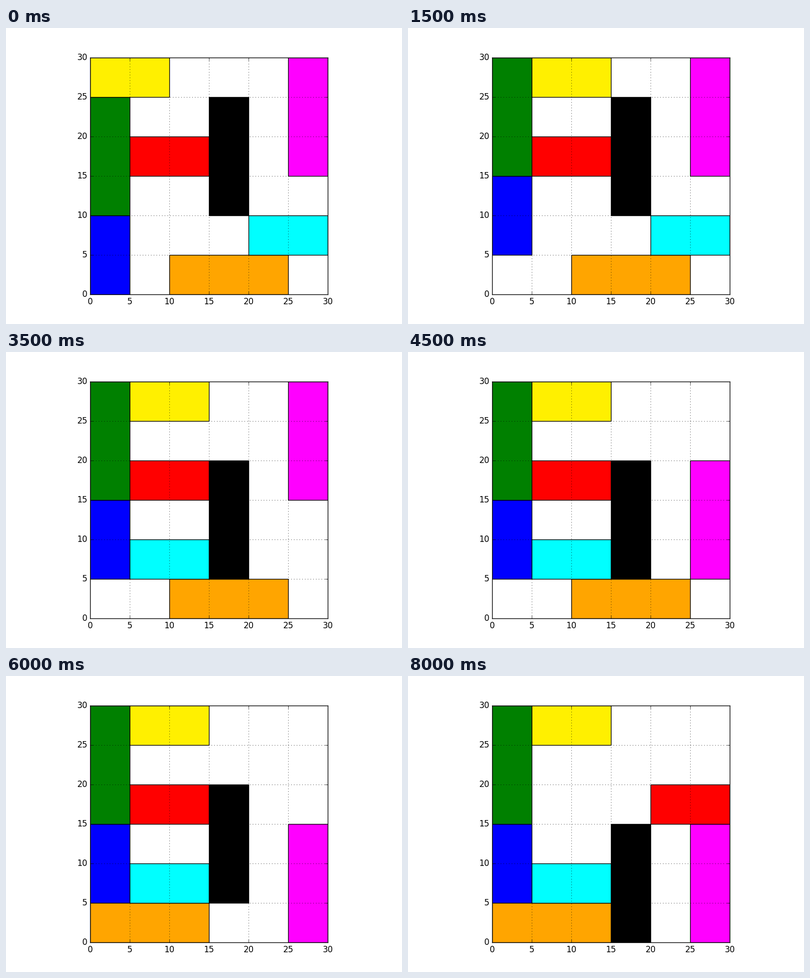
A matplotlib script for the animation above (8500 ms loop, 800 by 600 pixels).

```python
import matplotlib.pyplot as plt
from matplotlib.animation import FuncAnimation
from matplotlib.patches import Rectangle

plt.style.use("classic")
plt.rcParams["font.family"] = "DejaVu Sans"

CELL = 5
BOARD = 6 * CELL
STEP_MS = 500

# colour: column, row, width, height in cells
PIECES = {
    "blue": (0, 0, 1, 2),
    "green": (0, 2, 1, 3),
    "#fff000": (0, 5, 2, 1),
    "orange": (2, 0, 3, 1),
    "cyan": (4, 1, 2, 1),
    "magenta": (5, 3, 1, 3),
    "red": (1, 3, 2, 1),
    "black": (3, 2, 1, 3),
}

# colour, column step, row step, number of steps
MOVES = [
    ("#fff000", 1, 0, 1),
    ("green", 0, 1, 1),
    ("blue", 0, 1, 1),
    ("cyan", -1, 0, 3),
    ("black", 0, -1, 1),
    ("magenta", 0, -1, 3),
    ("orange", -1, 0, 2),
    ("black", 0, -1, 1),
    ("red", 1, 0, 3),
]
STEPS = [(name, dx, dy) for name, dx, dy, n in MOVES for _ in range(n)]

fig, ax = plt.subplots(figsize=(8, 6), dpi=100, facecolor="white")
ax.set_aspect("equal")
ax.set_xlim(0, BOARD)
ax.set_ylim(0, BOARD)
ax.set_xticks(range(0, BOARD + 1, CELL))
ax.set_yticks(range(0, BOARD + 1, CELL))
ax.grid(True)

blocks = {}
for color, (col, row, w, h) in PIECES.items():
    block = Rectangle((col * CELL, row * CELL), w * CELL, h * CELL,
                      facecolor=color, edgecolor="black", linewidth=1)
    blocks[color] = ax.add_patch(block)


def draw(step):
    """Place every block as it stands after the first `step` moves."""
    cells = {name: [col, row] for name, (col, row, _, _) in PIECES.items()}
    for name, dx, dy in STEPS[:step]:
        cells[name][0] += dx
        cells[name][1] += dy
    for name, (col, row) in cells.items():
        blocks[name].set_xy((col * CELL, row * CELL))
    return list(blocks.values())


anim = FuncAnimation(fig, draw, frames=len(STEPS) + 1, interval=STEP_MS,
                     repeat=True, repeat_delay=0)
plt.show()
```
